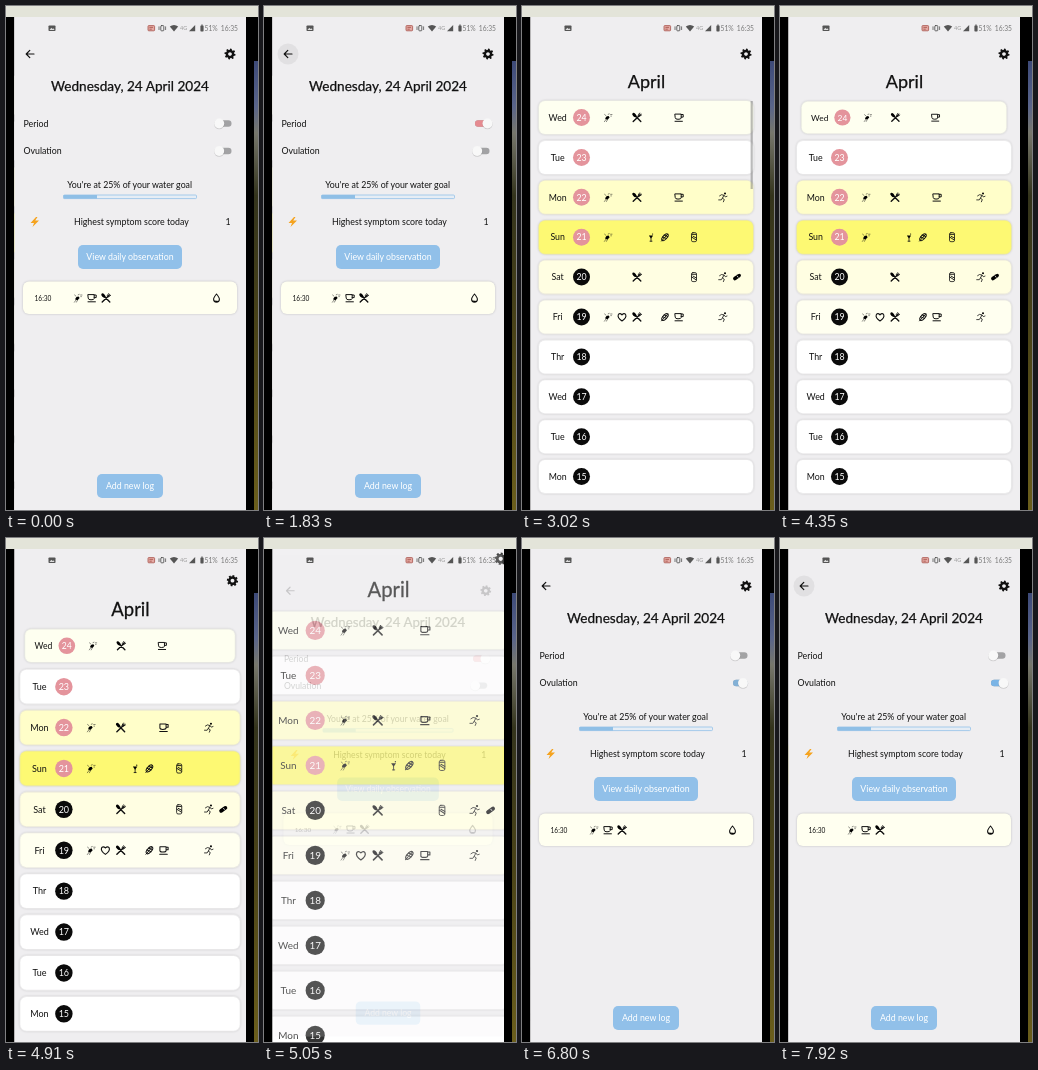
An HTML page for the animation above (7.99 s loop, 252 by 504 pixels).

```html
<!DOCTYPE html>
<html lang="en">
<head>
<meta charset="utf-8">
<title>Daily log</title>
<style>
  html, body { margin: 0; height: 100%; overflow: hidden; background: #000; }
  svg { display: block; width: 100vw; height: 100vh; }
  text { font-family: Lato, "Open Sans", sans-serif; font-size: 8.8px; fill: #111; }
  .mid { text-anchor: middle; }
  .light { fill: #fff; }
  .title { stroke: #111; stroke-width: .25; }
  .small { font-size: 6.7px; fill: #777; }
  .line { fill: none; stroke: #111; stroke-linecap: round; stroke-linejoin: round; }
  .lift { filter: drop-shadow(0 .8px 1px rgba(0, 0, 0, .2)); }
</style>
</head>
<body>
<svg viewBox="0 0 252 504">
  <defs>
    <clipPath id="clip"><rect x="8.5" y="11" width="231.5" height="493"/></clipPath>
    <linearGradient id="field" x2="0" y2="1">
      <stop stop-color="#3d4a78"/><stop offset=".1" stop-color="#59648a"/>
      <stop offset=".16" stop-color="#77776c"/><stop offset=".3" stop-color="#34341c"/>
      <stop offset=".6" stop-color="#4a4318"/><stop offset="1" stop-color="#6b5e1c"/>
    </linearGradient>
    <g id="gear" class="line">
      <circle r="3.1" stroke-width="2.5"/>
      <circle r="4.6" stroke-width="1.8" stroke-linecap="butt" pathLength="16" stroke-dasharray="1"/>
    </g>
    <g id="shower">
      <path d="M-2.8 1.6Q-2.4-1.6 .6-1.6L1.6 0L-.4 2.2Z"/>
      <path class="line" stroke-width=".7" opacity=".7" d="M-2 2L-3.6 4.2M-.6 2.4L-1.6 4.2M-3.4-3L-2-1.8M.2-3.2L1.2-3.6M2.6-3H4M2.8-1.4H3.4"/>
    </g>
    <path id="heart" class="line" stroke-width="1.1" d="M0 4C-7-.8-3-5.6 0-2.2C3-5.6 7-.8 0 4Z"/>
    <g id="food">
      <path class="line" stroke-width="1.4" d="M-3.8 4L3-2.6M3.8 4L-2.5-2.4"/>
      <ellipse cx="-2.6" cy="-2.4" rx="2.6" ry="1.5" transform="rotate(45 -2.6 -2.4)"/>
      <path class="line" stroke-width=".9" d="M2.6-4.4L1.2-2.2Q1.5-.8 2.6-1.2L4.6-2.6M3.7-3.6L2.2-1.8"/>
    </g>
    <path id="cup" class="line" stroke-width="1" d="M-3.8-3.4H2.2V.5Q2.2 1.8-1 1.8Q-3.8 1.8-3.8 .5ZM2.2-3H4.2V-.4H2.2M-4 3.8H3.4"/>
    <g id="glass">
      <path class="line" stroke-width=".8" d="M0 .5V4M-1 4H1"/>
      <path d="M-2.2-1.8H2.2L0 1.2Z"/><circle cx="1.6" cy="-3.2" r=".6"/>
    </g>
    <g id="snack" transform="rotate(-48)">
      <ellipse class="line" stroke-width="1" rx="4.2" ry="2"/>
      <path class="line" stroke-width=".9" d="M-5.2 0H4M-1.5-2L0 2M1-2L2.3 1.6"/>
    </g>
    <g id="can" class="line">
      <rect x="-2.5" y="-4.5" width="5" height="9" rx="1.4" stroke-width=".8"/>
      <path stroke-width=".9" d="M-2-2.8H2M-2.4-.2L2.2 2.8M-1-1L2.4 .9"/>
    </g>
    <g id="run">
      <circle cx="2" cy="-3.8" r="1"/>
      <path class="line" stroke-width=".8" d="M-3.4-1.4L-1.5-2.6L1-2L-.6 .9L1.3 2.2L.4 4.5M-.6 .9L-1.7 2.6H-4.3M1-2L2.3-.4L4-1"/>
    </g>
    <g id="pill" transform="rotate(-35)">
      <rect x="-4.4" y="-1.8" width="8.8" height="3.6" rx="1.8"/>
      <path stroke="#fff" stroke-width=".7" d="M.8-1V1"/>
    </g>
  </defs>

  <rect x="248" y="55" width="4" height="449" fill="url(#field)"/>
  <rect width="252" height="11" fill="#e3e4d9"/>

  <g clip-path="url(#clip)">
    <rect x="8" y="11" width="233" height="493" fill="#fff"/>
    <g id="list">
      <rect x="8" y="11" width="233" height="493" fill="#efeef0"/>
      <use href="#gear" x="224" y="48"/>
      <text class="mid title" x="124.5" y="82" style="font-size:18px">April</text>
      <g id="rows"></g>
      <rect id="bar" x="228.6" y="95" width="2.2" height="88" fill="#777"/>
    </g>
    <g id="detail">
      <rect x="8" y="11" width="233" height="493" fill="#efeef0"/>
      <circle id="ripple" cx="24" cy="48" r="10.5" opacity="0"/>
      <path class="line" stroke-width="1.2" d="M28 48H20.4M23.8 44.4L20.2 48L23.8 51.6"/>
      <use href="#gear" x="224" y="48"/>
      <text class="mid title" x="124" y="85.4" style="font-size:13.6px">Wednesday, 24 April 2024</text>
      <text x="17.5" y="120.5">Period</text>
      <text x="17.5" y="148">Ovulation</text>
      <g id="switches"></g>
      <text class="mid" x="123.7" y="182">You're at 25% of your water goal</text>
      <rect x="57.5" y="189" width="133" height="3.6" rx="1" fill="#e6edf5" stroke="#92c1e9" stroke-width=".8"/>
      <rect x="57.5" y="189" width="33.5" height="3.6" fill="#8fbfe6"/>
      <path d="M30 211L24.5 217H28L26.5 221L33 214.6H29.2L31.5 211Z" fill="#f5a31f"/>
      <text x="68" y="219">Highest symptom score today</text>
      <text class="mid" x="222" y="219">1</text>
      <rect x="72" y="239" width="104" height="24" rx="5" fill="#91c0e9"/>
      <text class="mid light" x="124" y="254">View daily observation</text>
      <rect class="lift" x="17" y="275.5" width="214" height="32.5" rx="6" fill="#fffff0"/>
      <text x="28.5" y="295" style="font-size:6.6px">16:30</text>
      <use href="#shower" x="72" y="292"/>
      <use href="#cup" x="86" y="292"/>
      <use href="#food" x="100" y="292"/>
      <path class="line" stroke-width="1.1" d="M210.5 288Q207.6 291.6 207.6 293.2A2.9 2.9 0 0 0 213.4 293.2Q213.4 291.6 210.5 288Z"/>
      <path d="M208 294.4L213 295Q210.5 297.4 208 294.4Z"/>
      <rect x="91" y="468" width="66" height="24" rx="5" fill="#91c0e9"/>
      <text class="mid light" x="124" y="483">Add new log</text>
    </g>
  </g>

  <g fill="#555">
    <rect x="42.5" y="19.5" width="7" height="5.5" rx=".8"/>
    <path d="M43.5 24L45.3 21.8L46.5 23L47.3 22.3L48.6 24Z" fill="#ddd"/>
    <rect x="142" y="19.6" width="6.6" height="5.2" rx=".8" fill="#e3a8a2" stroke="#a8544c" stroke-width=".8"/>
    <path class="line" style="stroke:#a8544c" stroke-width=".8" d="M143.8 21.4H146.6M143.8 23.2H145.4"/>
    <rect class="line" style="stroke:#555" x="154.8" y="19.6" width="3" height="5.2" rx=".7" stroke-width=".9"/>
    <path class="line" style="stroke:#555" stroke-width=".8" d="M153 20.8V23.6M159.6 20.8V23.6"/>
    <path d="M163.8 20.6Q168 17.4 172.2 20.6L168 25.4Z"/>
    <text x="174" y="24" style="font-size:5.5px;fill:#999">4G</text>
    <path d="M183 25.2H189.2V19Z"/>
    <rect x="194.4" y="19.4" width="3.2" height="6" rx=".7"/><rect x="195.2" y="18.6" width="1.6" height="1"/>
    <text class="small" x="198.6" y="24.8">51%</text>
    <text class="small" x="214.8" y="24.8">16:35</text>
  </g>
</svg>
<script>
const LOOP = 7990;
const $ = id => document.getElementById(id);
const set = (node, attrs) => { for (const k in attrs) node.setAttribute(k, attrs[k]); };

const iconX = { shower: 86, heart: 100, food: 115, glass: 129, snack: 143, cup: 157, can: 172, run: 201, pill: 215 };
const days = [
  ['Wed', '#fefff0', 'shower food cup'],
  ['Tue', '#fff', ''],
  ['Mon', '#fffec9', 'shower food cup run'],
  ['Sun', '#fdf973', 'shower glass snack can'],
  ['Sat', '#fffee2', 'food can run pill'],
  ['Fri', '#fffff0', 'shower heart food snack cup run'],
  ['Thr', '#fff', ''], ['Wed', '#fff', ''], ['Tue', '#fff', ''], ['Mon', '#fff', '']
];
$('rows').innerHTML = days.map(([name, color, icons], i) => {
  const y = 111.5 + i * 39.9, date = 24 - i;
  const uses = icons.split(' ').filter(Boolean)
    .map(n => `<use href="#${n}" x="${iconX[n]}" y="${y}"/>`).join('');
  return `<g><rect class="lift" x="17" y="${y - 16.5}" width="214" height="33" rx="6"
      fill="${color}" stroke="${color}" stroke-opacity=".5" stroke-width="1.6"/>
    <text class="mid" x="35.7" y="${y + 3.2}">${name}</text>
    <circle cx="59.5" cy="${y}" r="8.5" fill="${date > 20 ? '#e4949c' : '#0a0a0a'}"/>
    <text class="mid light" x="59.5" y="${y + 3.2}">${date}</text>${uses}</g>`;
}).join('');
const firstRow = $('rows').firstElementChild;

const makeSwitch = (y, color) => {
  const g = document.createElementNS('http://www.w3.org/2000/svg', 'g');
  g.innerHTML = `<rect x="211" y="${y - 3.2}" width="14.5" height="6.4" rx="3.2" fill="#a2a2a4"/>
    <rect x="211" y="${y - 3.2}" width="14.5" height="6.4" rx="3.2" fill="${color}"/>
    <g><circle cy="${y + .6}" r="5.2" opacity=".15"/><circle cy="${y}" r="5" fill="#f8f8f8"/></g>`;
  $('switches').append(g);
  const [, tint, thumb] = g.children;
  return v => {
    const e = v * v * (3 - 2 * v);
    set(tint, { opacity: e });
    set(thumb, { transform: `translate(${213.2 + 10.3 * e})` });
  };
};
const setPeriod = makeSwitch(117.5, '#e58a90');
const setOvulation = makeSwitch(145, '#7ab4e6');

// Piecewise linear value of a list of [time, value] keys
const track = (t, keys) => {
  const i = keys.findIndex(k => k[0] > t);
  if (i < 0) return keys[keys.length - 1][1];
  if (!i) return keys[0][1];
  const [t0, a] = keys[i - 1], [t1, b] = keys[i];
  return a + (b - a) * (t - t0) / (t1 - t0);
};
const zoom = s => `translate(124.5 261) scale(${s}) translate(-124.5 -261)`;

function draw(t) {
  // open: 0 shows the list, 1 the day page
  const open = track(t, [
    [2340, 1], [2404, .84], [2423, .6], [2460, .25], [2492, .14], [2573, .05], [2798, 0],
    [4840, 0], [4910, .16], [4980, .6], [5050, .85], [5120, .96], [5190, 1]
  ]);
  const alpha = track(t, [[2383, 1], [2470, 0], [5035, 0], [5050, .17], [5120, 1]]);
  set($('list'), {
    transform: zoom(1 + .15 * open),
    opacity: track(t, [[4930, 1], [5050, .84], [5120, .5]])
  });
  set($('detail'), { transform: zoom(.85 + .15 * open), opacity: alpha });

  setPeriod(track(t, [[480, 0], [780, 1], [5790, 1], [6060, 0]]));
  setOvulation(track(t, [[6590, 0], [6900, 1]]));

  const again = t > 5000;
  const grow = again ? track(t, [[7620, 0], [7850, 1]]) : track(t, [[1530, 0], [1780, 1]]);
  const shade = again ? grow : grow * track(t, [[2180, 1], [2400, 0]]);
  set($('ripple'), { r: 4 + 6.5 * grow, opacity: .06 * shade });

  const press = track(t, [[3990, 0], [4130, .7], [4300, 1], [4910, 1], [5030, 0]]);
  set(firstRow, { transform: `translate(124 111.5) scale(${1 - .045 * press}) translate(-124 -111.5)` });
  set($('bar'), { opacity: track(t, [[2980, .6], [3240, 0]]) });
}

function frame(now) {
  draw(now % LOOP);
  requestAnimationFrame(frame);
}
draw(0);
requestAnimationFrame(frame);
</script>
</body>
</html>
```
